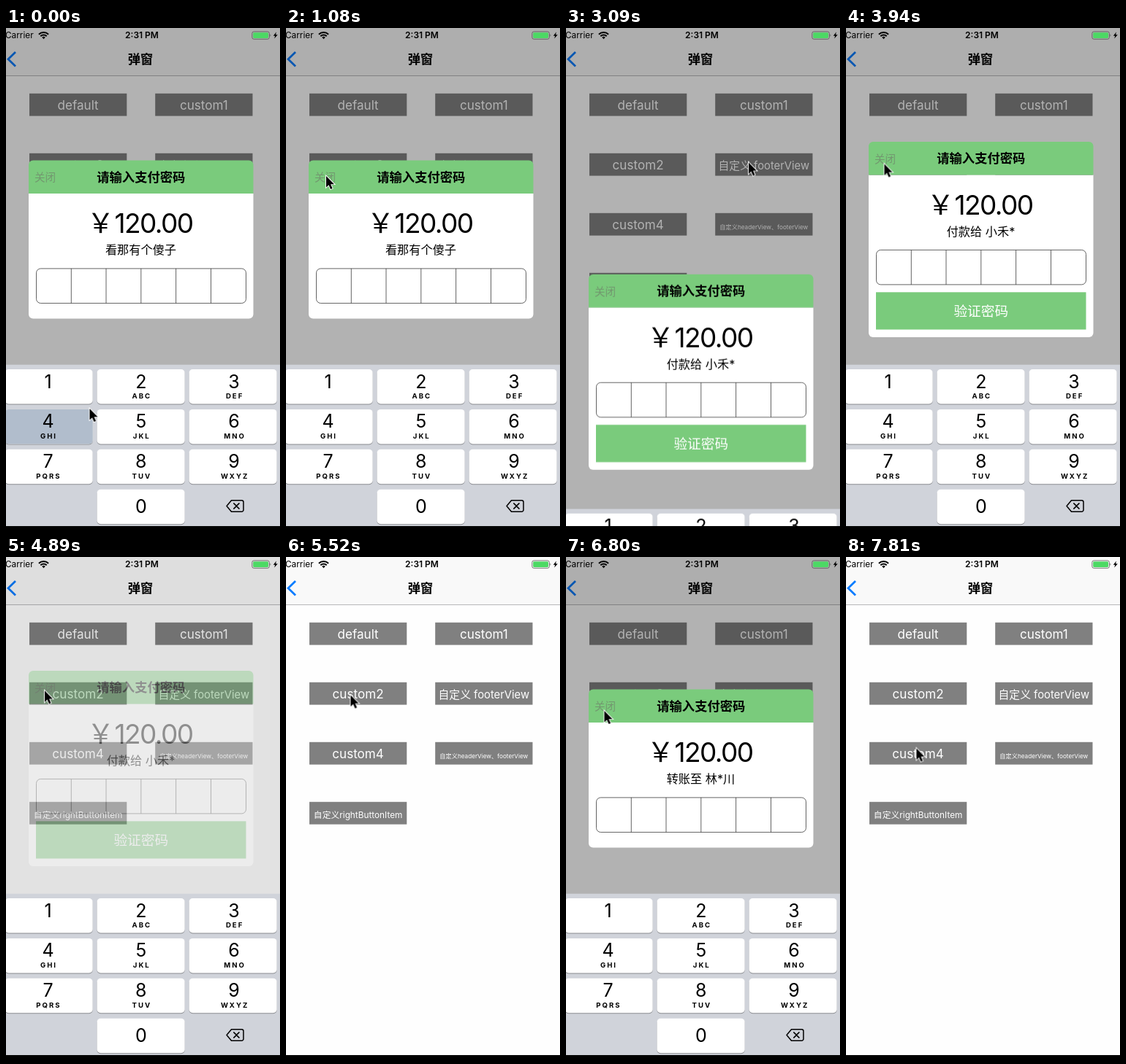
An HTML page for the animation above (8000 ms loop, 375 by 687 pixels).

```html
<!DOCTYPE html>
<html lang="zh-CN">
<head>
<meta charset="utf-8">
<title>弹窗</title>
<style>
  :root {
    --out: linear(0, .025 3.3%, .2 10%, .4 16.7%, .57 23.3%, .76 33.3%, .9 46.7%, .973 66.7%, 1);
    --in: linear(0, .1 3.3%, .325 10%, .52 16.7%, .73 26.7%, .883 40%, .97 60%, 1);
  }
  html, body { margin: 0; width: 100%; height: 100%; overflow: hidden; background: #fefefe; }
  svg { display: block; width: 100vw; height: 100vh; }
  text { font-family: Inter, "Noto Sans CJK SC", "Noto Sans CJK", sans-serif; }
  .cjk { font-family: "Noto Sans CJK SC", "Noto Sans CJK", sans-serif; }
  .mid { text-anchor: middle; }
  .bold { font-weight: 700; }
  .anim { animation: 8s linear infinite; }

  #dim { animation-name: dim; }
  #pay1 { animation-name: pay1; }
  #pay2 { animation-name: pay2; }
  #pay3 { animation-name: pay3; }
  #rise2 { animation-name: rise2; }
  #rise3 { animation-name: rise3; }
  #keyboard { animation-name: keyboard; }
  #cursor { animation-name: cursor; }
  #press { animation-name: press; }

  @keyframes press {
    0%, .75% { opacity: 1; }
    3.5%, 100% { opacity: 0; }
  }
  @keyframes dim {
    0%, 16.5% { opacity: 1; }
    18.75% { opacity: 0; }
    38.6% { opacity: 0; animation-timing-function: step-end; }
    38.62%, 59.62% { opacity: 1; }
    62% { opacity: 0; }
    73.47% { opacity: 0; animation-timing-function: step-end; }
    73.49%, 87.25% { opacity: 1; }
    89.6%, 100% { opacity: 0; }
  }
  @keyframes pay1 {
    0%, 16.5% { opacity: 1; }
    18.75%, 100% { opacity: 0; }
  }
  @keyframes pay2 {
    0% { opacity: 0; }
    38.6% { opacity: 0; animation-timing-function: step-end; }
    38.62%, 59.62% { opacity: 1; }
    62%, 100% { opacity: 0; }
  }
  @keyframes pay3 {
    0% { opacity: 0; }
    73.47% { opacity: 0; animation-timing-function: step-end; }
    73.49%, 87.25% { opacity: 1; }
    89.6%, 100% { opacity: 0; }
  }
  @keyframes rise2 {
    0% { transform: translateY(182px); }
    38.62% { transform: translateY(182px); animation-timing-function: var(--in); }
    44.24%, 100% { transform: translateY(0); }
  }
  @keyframes rise3 {
    0% { transform: translateY(182px); }
    73.49% { transform: translateY(182px); animation-timing-function: var(--in); }
    79.12%, 100% { transform: translateY(0); }
  }
  @keyframes keyboard {
    0% { transform: translateY(0); }
    18.94% { transform: translateY(0); animation-timing-function: var(--out); }
    24.56% { transform: translateY(223px); }
    38.6% { transform: translateY(223px); animation-timing-function: step-end; }
    38.62% { transform: translateY(198px); animation-timing-function: var(--in); }
    44.24% { transform: translateY(0); }
    62.06% { transform: translateY(0); animation-timing-function: var(--out); }
    67.69% { transform: translateY(223px); }
    73.47% { transform: translateY(223px); animation-timing-function: step-end; }
    73.49% { transform: translateY(198px); animation-timing-function: var(--in); }
    79.12% { transform: translateY(0); }
    89.69% { transform: translateY(0); animation-timing-function: var(--out); }
    95.31%, 100% { transform: translateY(223px); }
  }
  @keyframes cursor {
    0%, .75% { transform: translate(114.5px, 522px); }
    2.5% { transform: translate(165px, 450px); }
    4.4% { transform: translate(204px, 375px); }
    7.5% { transform: translate(130px, 265px); }
    10.5% { transform: translate(68px, 210px); }
    13.5%, 16.5% { transform: translate(55px, 203px); }
    19.1%, 20.6% { transform: translate(114px, 177px); }
    26.1% { transform: translate(150px, 122px); }
    28.7% { transform: translate(190px, 108px); }
    33.4%, 40.5% { transform: translate(250px, 184.5px); animation-timing-function: ease-in-out; }
    48.6% { transform: translate(55px, 187px); }
    49.25% { transform: translate(52.5px, 186.5px); }
    53%, 56.6% { transform: translate(51px, 183.5px); }
    59.62% { transform: translate(51px, 183px); animation-timing-function: ease-in-out; }
    69%, 75.6% { transform: translate(88.5px, 189.5px); animation-timing-function: ease-in-out; }
    82.9% { transform: translate(54px, 210.5px); }
    85%, 88% { transform: translate(52.5px, 211px); animation-timing-function: ease-in-out; }
    96.8%, 100% { transform: translate(96.5px, 262.5px); }
  }
</style>
</head>
<body>
<svg viewBox="0 0 375 687" xmlns="http://www.w3.org/2000/svg">
  <defs>
    <!-- Shared part of the payment dialogs, measured from the dialog's top -->
    <g id="pay">
      <path d="M31 45.500V6a6 6 0 0 1 6-6H332.500a6 6 0 0 1 6 6V45.500Z" fill="#7acb7c"/>
      <text x="39" y="28.500" font-size="14.600" fill="#72976f">关闭</text>
      <text class="mid bold" x="184.800" y="29.300" font-size="17.300">请输入支付密码</text>
      <text class="mid cjk" x="129.500" y="99.500" font-size="37">￥</text>
      <text class="mid" x="202" y="99.800" font-size="37" letter-spacing="-1.600">120.00</text>
      <g fill="none" stroke="#3c3c3c" stroke-width=".8">
        <rect x="41.500" y="148.400" width="287" height="47.500" rx="6"/>
        <path d="M89.300 148.400v47.500M137 148.400v47.500M184.800 148.400v47.500M232.600 148.400v47.500M280.500 148.400v47.500"/>
      </g>
    </g>
    <path id="short" d="M31 45.500H338.500V211a6 6 0 0 1-6 6H37a6 6 0 0 1-6-6Z" fill="#fff"/>
    <path id="tall" d="M31 45.500H338.500V262a6 6 0 0 1-6 6H37a6 6 0 0 1-6-6Z" fill="#fff"/>
  </defs>

  <rect width="375" height="687" fill="#fefefe"/>
  <rect width="375" height="65.500" fill="#f9f9f9"/>
  <path d="M0 65.500H375" stroke="#b8b8ba" stroke-width="1"/>
  <path d="M13 33L3 42.700L13 52.400" fill="none" stroke="#0a7cff" stroke-width="2.800"/>
  <text class="mid bold" x="184" y="49" font-size="17.200">弹窗</text>
  <g id="buttons"></g>

  <rect id="dim" class="anim" width="375" height="687" fill="rgba(0,0,0,.3)"/>

  <g id="status">
    <text x="-1" y="14.200" font-size="11.800">Carrier</text>
    <g fill="none" stroke="#000" stroke-width="2">
      <path d="M44.900 8.700a9.500 9.500 0 0 1 13.200 0M47.300 11.200a6 6 0 0 1 8.400 0"/>
    </g>
    <path d="M51.500 15.300l-2.300-2.500a3.300 3.300 0 0 1 4.600 0Z"/>
    <text class="mid" x="186" y="14.200" font-size="12" font-weight="600">2:31 PM</text>
    <rect x="336.800" y="4.900" width="23.600" height="10.400" rx="2.500" fill="none" stroke="#555" stroke-width=".8"/>
    <rect x="338.200" y="6.300" width="20.800" height="7.600" rx="1.300" fill="#4cd964"/>
    <path d="M361.500 8.300q1.800 1.800 0 3.600Z" fill="#555"/>
    <path d="M370 5.500L365.800 10.700H368.300L367.200 14.600L371.800 9.300H369.100Z"/>
  </g>

  <g id="pay1" class="anim">
    <g transform="translate(0 181.500)">
      <use href="#short"/>
      <use href="#pay"/>
      <text class="mid" x="184.500" y="128.500" font-size="16.200">看那有个傻子</text>
    </g>
  </g>
  <g id="pay2" class="anim">
    <g id="rise2" class="anim">
      <g transform="translate(0 156)">
        <use href="#tall"/>
        <use href="#pay"/>
        <text class="mid" x="184.500" y="128.500" font-size="16.200">付款给 小禾*</text>
        <rect x="41" y="206.300" width="287.500" height="51.200" fill="#7acb7c"/>
        <text class="mid" x="184.800" y="239" font-size="18.700" fill="#fff">验证密码</text>
      </g>
    </g>
  </g>
  <g id="pay3" class="anim">
    <g id="rise3" class="anim">
      <g transform="translate(0 181.500)">
        <use href="#short"/>
        <use href="#pay"/>
        <text class="mid" x="184.500" y="128.500" font-size="16.200">转账至 林*川</text>
      </g>
    </g>
  </g>

  <g id="keyboard" class="anim">
    <rect y="461.700" width="375" height="226" fill="#d0d3da"/>
    <g id="keys"></g>
    <path d="M308.500 647.700H322.500a2.500 2.500 0 0 1 2.500 2.500V660.800a2.500 2.500 0 0 1-2.500 2.500H308.500L302 655.500ZM311.800 651.900l7.200 7.200M319 651.900l-7.200 7.200"
      fill="none" stroke="#000" stroke-width="1.500" stroke-linejoin="round" stroke-linecap="round"/>
  </g>

  <rect y="683" width="375" height="4"/>
  <g id="cursor" class="anim">
    <path d="M0 0V15.500L3.500 12.200L6 18L8.600 16.900L6.100 11.200H11Z" stroke="#fff" stroke-width="1.800" paint-order="stroke"/>
  </g>
</svg>
<script>
  const put = (id, html) => { document.getElementById(id).innerHTML = html; };

  // label, column, row, font size
  const buttons = [
    ["default", 0, 0, 17.1], ["custom1", 1, 0, 17.1],
    ["custom2", 0, 1, 17.1], ["自定义 footerView", 1, 1, 14.8],
    ["custom4", 0, 2, 17.1], ["自定义headerView、footerView", 1, 2, 8.2],
    ["自定义rightButtonItem", 0, 3, 11.8]
  ];
  put("buttons", buttons.map(([label, col, row, size]) => {
    const x = 32 + col * 172.2, y = 89.8 + row * 82;
    return `<rect x="${x}" y="${y}" width="133.3" height="30.8" fill="#808080"/>
      <text class="mid" x="${x + 66.6}" y="${y + 22.1}" font-size="${size}" fill="#fff">${label}</text>`;
  }).join(""));

  const letters = ["", "ABC", "DEF", "GHI", "JKL", "MNO", "PQRS", "TUV", "WXYZ"];
  const key = (digit, sub, col, row) => {
    const x = -1.5 + col * 126, y = 468 + row * 54.9, mid = 57.5 + col * 127.3;
    const box = `x="${x}" y="${y}" width="120.2" height="47.5" rx="5"`;
    return `<rect x="${x}" y="${y + 1}" width="120.2" height="47.5" rx="5" fill="#898b8f"/>
      <rect ${box} fill="#fff"/>
      ${digit === 4 ? `<rect id="press" class="anim" ${box} fill="#b1bdcc"/>` : ""}
      <text class="mid" x="${mid}" y="${y + (digit ? 25.5 : 32)}" font-size="25">${digit}</text>
      <text class="mid" x="${mid + 1}" y="${y + 40}" font-size="9.6" font-weight="700" letter-spacing="2">${sub}</text>`;
  };
  put("keys", letters.map((sub, i) => key(i + 1, sub, i % 3, Math.floor(i / 3))).join("") + key(0, "", 1, 3));
</script>
</body>
</html>
```
